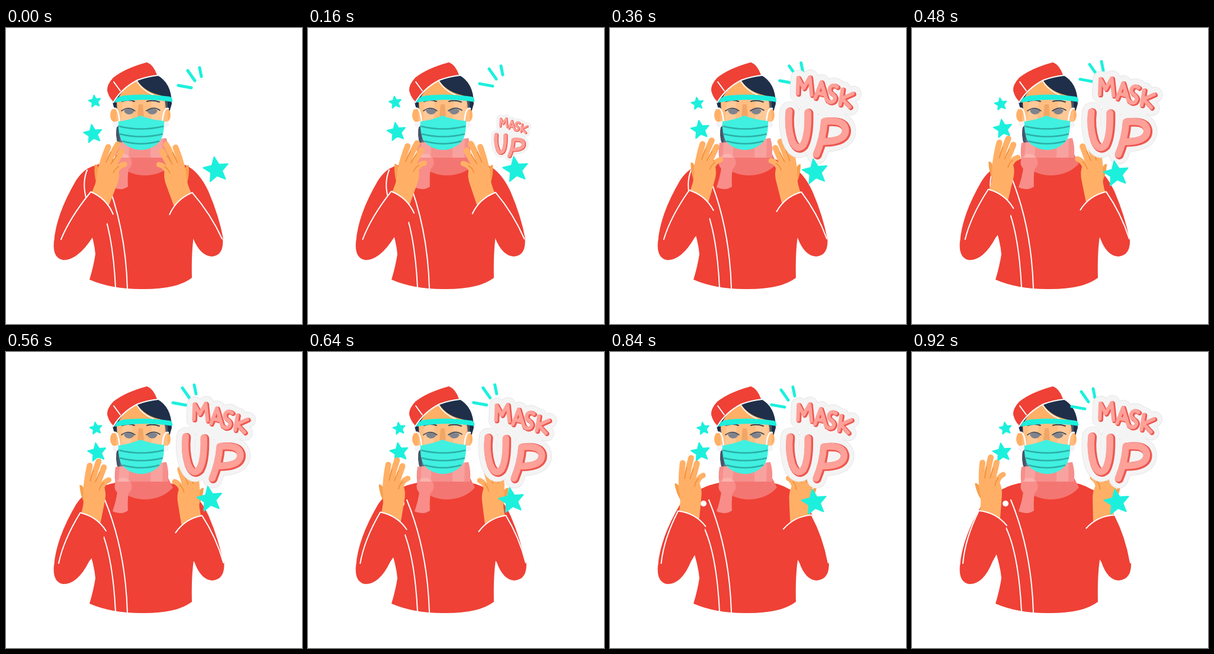
Animation, 500 px wide and 500 px high, one loop 960 ms. Source, as an HTML page:

```html
<!DOCTYPE html>
<html lang="en">
<head>
<meta charset="utf-8">
<title>Mask up</title>
<style>
  html, body { margin: 0; width: 100%; height: 100%; overflow: hidden; background: #fff; }
  svg { display: block; width: 100vw; height: 100vh; }
  .red { fill: #ef4136; }
  .skin { fill: #ffb066; }
  .cyan { fill: #1cf0dd; }
  .navy { fill: #1f2f49; }
  .star { stroke: #1cf0dd; stroke-width: 2; stroke-linejoin: round; }
  .seam, .finger, .crease, .ray, .letters { fill: none; stroke-linecap: round; stroke-linejoin: round; }
  .seam { stroke: #fff; stroke-width: 2; }
  .finger { stroke: #ffb066; stroke-width: 10; }
  .crease { stroke: #ee8d3c; stroke-width: 1.6; }
  .ray { stroke: #1cf0dd; stroke-width: 5; }
</style>
</head>
<body>
<svg viewBox="0 0 500 500" xmlns="http://www.w3.org/2000/svg">
  <defs>
    <g id="hand">
      <path fill="#f6a04f" d="M106 222Q109 220 113 225L120 232L117 250Q109 238 106 222Z"/>
      <path class="skin" d="M113 276Q119 252 114 234Q111 216 122 209L141 210Q152 222 152 238Q151 256 148 292Z"/>
      <path class="finger" d="M118 226Q117 208 119 187M126 220Q128 198 133 178M135 220Q139 204 143 187"/>
      <path class="finger" style="stroke-width:9" d="M143 224Q145 211 154 207"/>
      <path class="crease" d="M123 213Q124 203 126 194M132 213Q134 204 137 196M140 226Q141 218 146 213"/>
    </g>
    <path id="word" d="M318 114L319 88L328 105L338 87L341 116M347 121L357 95L366 125M351 113L363 116M383 103Q375 97 371 105Q369 111 376 115Q383 121 377 127Q371 130 367 125M392 107L388 132M409 114L391 122L404 136"/>
    <path id="big" d="M304 143Q301 168 308 190Q316 210 327 199Q336 184 335 145M362 160Q360 188 349 214M362 160Q394 156 397 173Q398 193 360 193"/>
  </defs>

  <!-- torso -->
  <path class="red" d="M150 233Q168 223 190 220L270 220Q294 224 312 238L325 300L317 352Q313 380 314 422Q288 442 228 441Q178 441 141 425Q148 402 151 382Q149 360 139 330L135 240Z"/>
  <path class="red" d="M152 232Q132 236 118 258Q84 316 81 362L97 375L140 310L165 260Z"/>
  <path class="red" d="M304 232Q326 242 342 276Q360 318 367 356L320 330L290 240Z"/>
  <path class="seam" d="M137 240Q128 262 136 290M158 295Q180 340 185 438M167 250Q202 335 205 440"/>
  <circle cx="158" cy="256" r="5" fill="#fff"/>

  <!-- head -->
  <path class="navy" d="M188 162Q183 182 190 199L204 199L203 165Z"/>
  <path fill="#f39a4d" d="M200 175H260V212H200Z"/>
  <path class="navy" d="M180 126Q190 95 235 82L254 79Q280 92 280 128L276 142L184 140Z"/>
  <ellipse class="skin" cx="184" cy="147" rx="8" ry="12"/>
  <ellipse class="skin" cx="270" cy="147" rx="8" ry="12"/>
  <path class="skin" d="M187 124Q200 95 222 89Q234 108 262 114Q272 118 269 152Q264 200 228 204Q192 199 189 154Z"/>
  <path class="seam" style="stroke-width:1.5" d="M221 90Q231 106 249 113"/>
  <path class="red" d="M171 106Q170 96 181 84Q201 68 238 58Q249 62 255 79Q202 88 182 125Q174 118 171 106Z"/>
  <path class="seam" d="M181 126Q196 101 222 88Q238 82 256 80M182 91L193 106"/>
  <path fill="#ee9245" d="M224 129H231L233 149H222Z"/>

  <!-- scarf -->
  <path fill="#f47672" d="M185 194Q228 190 271 186Q275 200 274 213L282 229Q264 249 233 249Q207 248 186 229Q182 212 185 194Z"/>
  <path fill="#f88d89" d="M188 236L207 238Q205 252 206 268Q194 276 180 269Q186 252 188 236Z"/>
  <circle cx="198" cy="227" r="14.5" fill="#f88d89"/>

  <!-- face shield, with eyes and mask kept clear -->
  <path fill="#fff" opacity=".18" d="M187 124Q230 114 273 124L274 219H184Z"/>
  <path fill="#fff" opacity=".17" d="M197 123H214L207 219H190ZM246 121H267L264 219H244Z"/>
  <g fill="none" stroke="#394354" stroke-linecap="round">
    <path stroke-width="2" d="M196 124Q207 120 217 124M238 124Q248 121 259 125"/>
    <path fill="#7f838d" stroke="none" d="M199 139Q208 133 217 139Q215 146 208 146Q201 146 199 139ZM238 139Q247 133 256 139Q254 146 247 146Q240 146 238 139Z"/>
    <path stroke-width="1.6" d="M195 140Q207 131 218 140M237 140Q249 131 260 139"/>
  </g>
  <circle cx="185" cy="163" r="5" fill="#f3f3f7"/>
  <circle cx="270" cy="163" r="5" fill="#f3f3f7"/>
  <path class="seam" style="stroke-width:2.5" d="M181 136Q190 132 192 160M274 136Q266 133 264 160"/>
  <path fill="#40f0e0" d="M190 158Q211 155 227 148Q245 155 267 157Q268 177 261 190Q247 206 228 206Q207 205 195 190Q189 178 190 158Z"/>
  <path fill="none" stroke="#2bb0a8" stroke-width="2.6" d="M191 166Q228 175 266 166M192 179Q228 188 265 179M197 191Q228 200 259 191"/>
  <path class="cyan" d="M183 126Q187 115 200 114Q236 110 277 116Q282 118 281 125Q232 117 183 126Z"/>

  <path id="smallStar" class="cyan star"/>
  <path id="midStar" class="cyan star"/>
  <path id="rays" class="ray" d="M291 97L313 101M307 72L319 89M327 67L330 82"/>

  <g id="armL"><use href="#hand"/><path class="red"/><path class="seam"/></g>
  <g id="armR"><use href="#hand"/><path class="red"/><path class="seam"/></g>

  <g id="sticker" class="letters">
    <g stroke="#e6e6e6"><use href="#word" stroke-width="27"/><use href="#big" stroke-width="33"/></g>
    <g stroke="#f4f4f4"><use href="#word" stroke-width="25"/><use href="#big" stroke-width="31"/></g>
    <path d="M322 120L380 142L372 175" stroke="#f4f4f4" stroke-width="28"/>
    <g stroke="#ee574f" transform="translate(1 .6)"><use href="#word" stroke-width="8"/><use href="#big" stroke-width="14.5"/></g>
    <g stroke="#fda199" transform="translate(-.8 -.6)"><use href="#word" stroke-width="6"/><use href="#big" stroke-width="11.5"/></g>
  </g>
  <path id="bigStar" class="cyan star"/>
</svg>

<script>
const $ = id => document.getElementById(id);
const { sin, cos, PI } = Math;
const STEP = 40, STEPS = 24;
const mix = (a, b, p) => a + (b - a) * p;
const smooth = v => {
  v = Math.min(1, Math.max(0, v));
  return v * v * (3 - 2 * v);
};

function starPath(r) {
  const pts = Array.from({ length: 10 }, (_, i) => {
    const a = (i * 36 - 99) * PI / 180, q = i % 2 ? r * .46 : r;
    return [q * cos(a), q * sin(a)];
  });
  return `M${pts.join("L")}Z`;
}

// Each star drifts along a slow arc.
const stars = [
  { el: $("smallStar"), r: 10.5, x: u => 152.5 - 5.5 * cos(4.25 * (u - .26)), y: u => 124 + 5.5 * sin(1.9 * u) },
  { el: $("midStar"), r: 16, x: u => 147 + 7 * sin(2.3 * u), y: u => 179 - 10 * sin(2 * u) },
  { el: $("bigStar"), r: 22, x: u => 355 - 11 * sin(2.2 * u), y: u => 246.5 - 7.5 * cos(3.7 * (u - .1)) }
];
for (const s of stars) s.el.setAttribute("d", starPath(s.r));

// Arms share one hand; the right one is mirrored about x = 229.5.
const arms = [
  { el: $("armL"), sign: 1, x: p => 162 - 26 * p, y: p => 294 - 15 * p, turn: p => 17 * (1 - p),
    end: p => [93 - 7 * p, 357], elbow: p => [146 - 10 * p, 354], bend: [-10, 3],
    tail: () => "L81 360Q78 389 97 392Q121 392 " },
  { el: $("armR"), sign: -1, x: p => 163.5 - 23.5 * p, y: p => 295 - 10 * p, turn: p => 16 - 19 * p,
    end: p => [365 + 4 * p, 356], elbow: p => [316 + 4 * p, 355], bend: [6, -3],
    tail: p => `L${366 + 4 * p} 354Q${369 + 3 * p} 384 ${348 + p} 386Q${328 + 2 * p} 385 ` }
];

function drawArm(arm, p) {
  const x = arm.x(p), y = arm.y(p), turn = arm.turn(p), a = turn * PI / 180;
  const mirror = arm.sign < 0;
  const pt = (u, v) => {
    const px = x + u * cos(a) - v * sin(a);
    return [mirror ? 459 - px : px, y + u * sin(a) + v * cos(a)];
  };
  const between = (m, n, dx, dy) => [mix(m[0], n[0], .5) + dx, mix(m[1], n[1], .5) + dy];
  const outer = pt(-23, -11), dip = pt(6, -8), inner = pt(24, 14);
  const end = arm.end(p), elbow = arm.elbow(p);
  const line = `M${inner}Q${dip} ${outer}Q${between(outer, end, ...arm.bend)} ${end}`;
  const [hand, sleeve, seam] = arm.el.children;
  hand.setAttribute("transform",
    (mirror ? "translate(459 0) scale(-1 1) " : "") +
    `translate(${x - 136} ${y - 279}) rotate(${turn} 136 279)`);
  sleeve.setAttribute("d", `${line}${arm.tail(p)}${elbow}Q${between(elbow, inner, 5 * arm.sign, 3)} ${inner}Z`);
  seam.setAttribute("d", line);
}

function draw(step) {
  const u = step / (STEPS - 1);
  const swing = (smooth(u) + u ** 1.4) / 2;
  for (const arm of arms) drawArm(arm, swing);
  for (const s of stars) s.el.setAttribute("transform", `translate(${s.x(u)} ${s.y(u)})`);
  $("rays").setAttribute("transform", `translate(${-21 * u ** 1.7} ${-11.5 * sin(2.7 * u ** 1.35)})`);

  // Pops up, then breathes gently.
  const size = smooth((step - 1.5) / 5) * (1 + .025 * cos((step - 9) * PI / 9));
  $("sticker").style.display = size > 0 ? "" : "none";
  $("sticker").setAttribute("transform", `translate(332 218) scale(${size}) translate(-332 -218)`);
}

const start = performance.now();
function frame() {
  draw(Math.floor((performance.now() - start) / STEP) % STEPS);
  requestAnimationFrame(frame);
}
frame();
</script>
</body>
</html>
```
